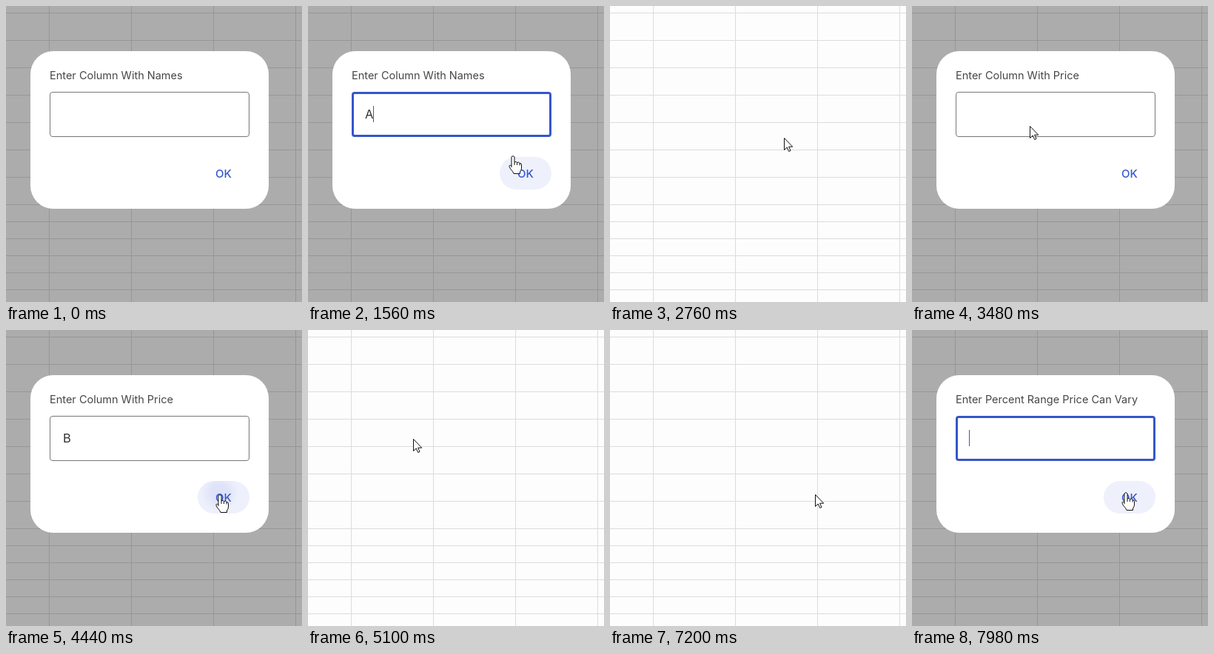
Recreate the animation shown at these times as an HTML page. Size 400x400 px, loop 8 s.

```html
<!DOCTYPE html>
<html lang="en">
<head>
<meta charset="utf-8">
<title>Column prompts</title>
<style>
  html, body { margin: 0; width: 100%; height: 100%; overflow: hidden; background: #fdfdfd; }
  svg { display: block; width: 100vw; height: 100vh; }
  text { font-family: Inter, Roboto, sans-serif; white-space: pre; }
  .icon { fill: #fff; stroke: #111; stroke-linejoin: round; }
</style>
</head>
<body>
<svg viewBox="0 0 400 400">
  <defs>
    <clipPath id="pillClip"><rect x="259" y="204" width="70" height="44" rx="22"/></clipPath>
    <radialGradient id="glow">
      <stop offset="0.4" stop-color="#d5d9f6"/>
      <stop offset="1" stop-color="#d5d9f6" stop-opacity="0"/>
    </radialGradient>
  </defs>

  <rect width="400" height="400" fill="#fdfdfd"/>
  <path id="grid" stroke="#dcdcdc" fill="none"/>
  <rect id="scrim" width="400" height="400"/>

  <g id="dialog">
    <rect x="33" y="61" width="322" height="213" rx="31" fill="#fff"/>
    <text id="title" x="59" y="99" font-size="14.5" fill="#444746"></text>
    <rect id="field" fill="#fff"/>
    <text id="value" x="77" y="152" font-size="16.5" fill="#333"></text>
    <rect id="caret" y="135" width="1" height="22" fill="#3556cb"/>
    <rect id="pill" x="259" y="204" width="70" height="44" rx="22" fill="#eef1fc"/>
    <g clip-path="url(#pillClip)"><circle id="ripple" cx="289" cy="220" fill="url(#glow)"/></g>
    <text x="294" y="232" font-size="15" font-weight="500" text-anchor="middle" fill="#3558cf">OK</text>
  </g>

  <g id="pointer">
    <path id="arrow" class="icon" d="M.5.5V16.5L4.2 13 6.7 18.5 9 17.5 6.6 12.2H11.7Z"/>
    <path id="beam" stroke="#111" fill="none" d="M-3-7.5H0M1-7.5H4M.5-7V7M-3 7.5H0M1 7.5H4"/>
    <g id="hand" class="icon">
      <path d="M-2 14V2Q0-1 2 2V9Q4.500 7.500 5.500 9.500 8 8.300 9 10.500 11.500 10 11.500 13V17Q11.500 20 9.500 22V24.500H1Q0 21.500-3.500 18L-5 15Q-5.300 12-2 14Z"/>
      <path fill="none" d="M2 9V13M5.500 9.500V13M9 10.500V13.500M-2 14V16"/>
    </g>
  </g>
</svg>
<script>
const LOOP = 8000, STEP = 60, START = 180;
const FIELD = [146, 152], OK = [289, 222];
const $ = id => document.getElementById(id);
const set = (id, attrs) => {
  for (const k in attrs) $(id).setAttribute(k, attrs[k]);
};
const clamp = v => Math.max(0, Math.min(1, v));

// Times in ms; rest is where the pointer drifts once the prompt has closed
const prompts = [
  { title: "Enter Column With Names", key: "A", open: -500, focus: 660, type: 900, press: 1680, close: 2100, rest: [235, 178] },
  { title: "Enter Column With Price", key: "B", open: 2940, focus: 3660, type: 3960, press: 4380, close: 4500, rest: [142, 147] },
  { title: "Enter Column To Write To", key: "C", open: 5340, focus: 5580, type: 6000, press: 6720, close: 6960, rest: [275, 222] },
  { title: "Enter Percent Range Price Can Vary", key: "", open: 7500, focus: 7980, type: LOOP, press: LOOP, close: LOOP, aim: [219, 163] }
];

// Every prompt: glide to the field, then to the button, then away
const glides = prompts.flatMap(({ open, focus, press, close, rest = OK, aim = FIELD }) => [
  { from: Math.max(open, focus - 480, START), to: focus, goal: aim },
  { from: press - 420, to: press, goal: OK },
  { from: close, to: close + 360, goal: rest }
]);

// x slows down while y runs evenly, which bends the path
function pointerAt(t) {
  let x = 168, y = 363;
  for (const { from, to, goal } of glides) {
    const p = clamp((t - from) / (to - from));
    x += (goal[0] - x) * p * (2 - p);
    y += (goal[1] - y) * p;
  }
  return [Math.round(x), Math.round(y)];
}

function drawGrid() {
  let d = "";
  for (let x = 58; x < 400; x += 111) d += `M${x + .5} 0V400`;
  for (let y = 9; y < 400; y += y < 268 ? 37 : 23) d += `M0 ${y + .5}H400`;
  set("grid", { d });
}

function drawDialog(p, t, opened, closed) {
  const scale = 1 - 0.2 * (1 - opened) ** 3;
  set("dialog", {
    opacity: clamp(opened * 2) * clamp(1 - closed * 2),
    transform: `translate(194 167.5) scale(${scale}) translate(-194 -167.5)`
  });
  $("title").textContent = p.title;
  $("value").textContent = t >= p.type ? p.key : "";

  const focused = t >= p.focus && t < p.press, w = focused ? 3 : 1;
  set("field", {
    x: 59 + w / 2, y: 116 + w / 2, width: 270 - w, height: 61 - w,
    rx: 4 - w / 2, stroke: focused ? "#3556cb" : "#777", "stroke-width": w
  });
  set("caret", {
    x: 77 + Math.floor($("value").getComputedTextLength()),
    opacity: +focused
  });

  const age = (t - p.press) / 360;
  set("ripple", {
    r: 18 + 50 * clamp(age),
    opacity: age > 0 ? 0.6 * clamp(1.5 - age) : 0
  });
}

function render(now) {
  const t = Math.floor(now % LOOP / STEP) * STEP;
  const p = prompts.filter(q => t >= q.open).pop();
  const opened = clamp((t - p.open) / 150), closed = clamp((t - p.close) / 150);
  const [x, y] = pointerAt(t);
  const live = opened === 1 && closed === 0;
  const hand = live && x >= 259 && x < 329 && y >= 200 && y < 248;
  const beam = live && t > p.focus && x >= 59 && x < 329 && y >= 116 && y < 177;

  set("scrim", { opacity: 0.32 * opened * (1 - closed) });
  drawDialog(p, t, opened, closed);

  set("pill", { opacity: +hand });
  set("hand", { opacity: +hand });
  set("beam", { opacity: +beam });
  set("arrow", { opacity: +!(hand || beam) });
  set("pointer", { transform: `translate(${x} ${y})`, opacity: +(t >= START) });
}

function tick() {
  render(performance.now());
  requestAnimationFrame(tick);
}

drawGrid();
tick();
</script>
</body>
</html>
```
